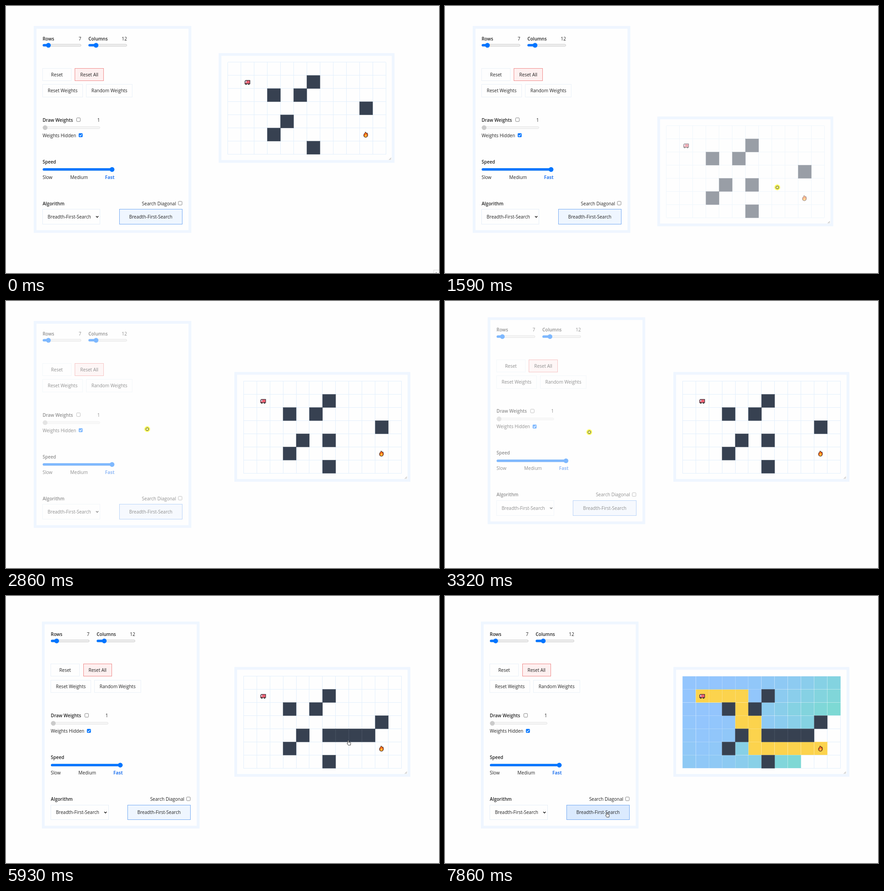
Recreate the animation shown at these times as an HTML page. Size 952 by 588 pixels, loop 7990 ms.

```html
<!DOCTYPE html>
<html lang="en">
<head>
<meta charset="utf-8">
<title>Pathfinding grid</title>
<style>
html, body { margin: 0; width: 100%; height: 100%; overflow: hidden; background: #fefefe; }
svg { display: block; width: 952px; height: 588px; font: 10px "Open Sans", "Noto Sans", sans-serif; fill: #222; }
.b { font-weight: 600; }
.crisp, #lines, #cells { shape-rendering: crispEdges; }
#cells rect { stroke: #fff; stroke-opacity: .25; }
#walls rect { stroke: #4b5563; stroke-width: .5; }
</style>
</head>
<body>
<svg id="stage" viewBox="0 0 952 588"></svg>
<script>
const LOOP = 7990, CELL = 28.96, GX = 487.8, GY = 124.2;
const MAZE = [
  '............',
  '......#.....',
  '...#.#......',
  '..........#.',
  '....#.......',
  '...#........',
  '......#.....'];
const ROWS = MAZE.length, COLS = MAZE[0].length;
const START = COLS + 1, GOAL = 5 * COLS + 10;
const SEARCH = 7050, VISIT = 10, FADE = 800;

// Walls in place, then four more added along one row
const walls = [];
MAZE.forEach((line, r) => [...line].forEach((ch, c) => { if (ch === '#') walls.push({ c, r, time: 0 }); }));
[790, 5070, 5405, 5740].forEach((time, i) => walls.push({ c: 6 + i, r: 4, time }));

const ramp = (t, a, b) => Math.min(1, Math.max(0, (t - a) / (b - a)));
const add = (a, b) => [a[0] + b[0], a[1] + b[1]];
const dim = (t, a, b) => 1 - (ramp(t, a, a + 100) - ramp(t, b, b + 125)) / 2;

// A dragged panel circles a centre while its radius changes
function swirl(u, center, radius, angle, sweep, power) {
  const a = angle + sweep * u ** power;
  return add(center, [radius * Math.sin(a), radius * Math.cos(a)]);
}
function gridAt(t) {
  const u = ramp(t, 860, 2290);
  return swirl(u, [34.4, 52.4], (63 + 198 * u) * (1 - u) ** .78, -2.56, 16, .95);
}
function menuAt(t) {
  const u = ramp(t, 2930, 3990);
  return swirl(u, [37, 34], 50.3 - 21.6 * u, -2.314, 12.46, .81);
}

const GRAB_GRID = [662, 262], GRAB_MENU = [312, 280.5], LEAD = 70;
const stops = [
  [70, 930, 560], [530, ...GRAB_GRID],
  [2430, ...add(GRAB_GRID, gridAt(LOOP))], [2690, ...GRAB_MENU],
  [4400, 332, 294], [4860, 764, 300], [5010, 736, 307],
  [5860, 792, 313], [5930, 755, 323], [6300, 295, 470], [6460, 357, 482]];
function cursorAt(t) {
  if (t >= 790 && t < 2400) return add(GRAB_GRID, gridAt(t + LEAD));
  if (t >= 2710 && t < 4300) return add(GRAB_MENU, menuAt(t + LEAD));
  const i = stops.findIndex(s => t < s[0]);
  if (i < 1) return stops.at(i).slice(1);
  const [a, x, y] = stops[i - 1], [b, x2, y2] = stops[i], k = ramp(t, a, b);
  return [x + (x2 - x) * k, y + (y2 - y) * k];
}
const presses = [[790, 2420], [2660, 4260], [6990, 7060], ...walls.slice(-3).map(w => [w.time, w.time + 70])];
const hovers = [[400, 2500], [4700, 6000], [6250, LOOP]];
const within = (spans, t) => spans.some(([a, b]) => t >= a && t < b);

// Breadth-first search: discovery order and shortest path
function search() {
  const blocked = new Set(walls.map(w => w.r * COLS + w.c));
  const from = new Map([[START, -1]]), queue = [START];
  while (queue.length && !from.has(GOAL)) {
    const n = queue.shift(), c = n % COLS, r = (n - c) / COLS;
    for (const [dx, dy] of [[0, -1], [1, 0], [0, 1], [-1, 0]]) {
      const x = c + dx, y = r + dy, m = y * COLS + x;
      if (x < 0 || y < 0 || x >= COLS || y >= ROWS || blocked.has(m) || from.has(m)) continue;
      from.set(m, n);
      queue.push(m);
      if (m === GOAL) break;
    }
  }
  const path = [];
  for (let n = GOAL; n >= 0; n = from.get(n)) path.unshift(n);
  return { order: [...from.keys()], path };
}
const { order, path } = search();
const PATH = SEARCH + order.length * VISIT + 20;

// SVG pieces; text y is the visual middle of the capitals
const text = (s, x, y, anchor = 'start', extra = '') =>
  `<text x="${x}" y="${y + 3.6}" text-anchor="${anchor}" ${extra}>${s}</text>`;
const label = (s, x, y) => text(s, x, y, 'start', 'class="b"');
const box = (x, y, w, h, fill, stroke, extra = '') =>
  `<rect x="${x}" y="${y}" width="${w}" height="${h}" fill="${fill}" stroke="${stroke}" ${extra}/>`;
const button = (s, x, y, w, h, fill = '#fefefe', stroke = '#eaf1f8', extra = '') =>
  box(x, y, w, h, fill, stroke, 'class="crisp" ' + extra) + text(s, x + w / 2, y + h / 2 + .3, 'middle');
const frame = (x, y, w, h) => box(x, y, w, h, '#fefefe', '#eff6ff', 'stroke-width="6"');
function slider(x, y, w, thumb, off) {
  const track = off ? ['#f6f6f6', '#dcdcdc'] : ['#efefef', '#b9b9b9'], tint = off ? '#cbcbcb' : '#0075ff';
  return box(x, y - 2.3, w, 4.6, ...track, 'rx="2.3" stroke-width=".7"') +
    (off ? '' : box(x - .3, y - 2.6, thumb - x, 5.2, tint, 'none', 'rx="2.6"')) +
    `<circle cx="${thumb}" cy="${y}" r="5.2" fill="${tint}"/>`;
}
const check = (x, y, on) => on
  ? box(x, y, 8, 8, '#0075ff', '#0075ff', 'rx="1.3" stroke-width=".6"') +
    `<path d="M${x + 1.6} ${y + 4.2}l1.7 1.8 3.2-4" fill="none" stroke="#fff" stroke-width="1.3"/>`
  : box(x, y, 8, 8, '#fff', '#767676', 'rx="1.3" stroke-width=".9"');

const menu = `
<g id="menu">${frame(64, 47, 340.4, 449.6)}<g id="menuBody">
${label('Rows', 80.5, 72)}${text('7', 165.5, 72, 'end')}${slider(81, 86.5, 84, 93.3)}
${label('Columns', 181.2, 72)}${text('12', 266, 72, 'end')}${slider(181.6, 86.5, 84, 198)}
${button('Reset', 80.5, 137.5, 63, 27)}
${button('Reset All', 152, 137.5, 62.5, 27, '#fef0f0', '#f08a8a')}
${button('Reset Weights', 80.5, 172.7, 88, 27.5)}
${button('Random Weights', 176.7, 172.7, 101.3, 27.5)}
${label('Draw Weights', 80.5, 251)}${check(155.3, 246.4)}${text('1', 206.5, 251, 'end')}
${slider(81, 267.9, 125.5, 86, true)}
${text('Weights Hidden', 80.5, 285)}${check(160.2, 280.6, true)}
${label('Speed', 80.5, 343)}${slider(81, 360, 157, 233.2)}
${text('Slow', 80.5, 377)}${text('Medium', 141.3, 377)}
${text('Fast', 238.7, 377, 'end', 'style="font-weight:700;fill:#2f7cf0"')}
${label('Algorithm', 80.5, 435)}${text('Search Diagonal', 374, 435, 'end')}${check(379, 430.3)}
${box(80.5, 447.8, 126.5, 32.4, '#fefefe', '#e6eff8', 'class="crisp"')}${text('Breadth-First-Search', 91.6, 464.3)}
<path d="M198 462.8l2.6 2.7 2.6-2.7" fill="none" stroke="#111" stroke-width="1.4"/>
${button('Breadth-First-Search', 249.2, 447.8, 138.3, 32.4, '#eff6ff', '#74aaf3', 'id="run"')}
</g></g>`;

const cellBox = (c, r, fill) => box(GX + c * CELL, GY + r * CELL, CELL, CELL, fill, 'none');
let lines = '';
for (let c = 0; c <= COLS; c++) lines += `M${GX + c * CELL} ${GY}v${ROWS * CELL}`;
for (let r = 0; r <= ROWS; r++) lines += `M${GX} ${GY + r * CELL}h${COLS * CELL}`;

const truck = `<g transform="translate(531 168.6)">
<path d="M-5.5 3V-2.5L-4-4.5H5.5V3z" fill="#e63950" stroke="#23202a" stroke-width="1.1"/>
<path d="M-4.6-.2v-2.2l1-1.2h1.8v3.4z" fill="#bfe3f2"/>
<path d="M-.5-2.6H4.8M-5 1H5" stroke="#ffd0d4" stroke-width=".9"/>
<circle cx="-3" cy="3.6" r="1.5"/><circle cx="3" cy="3.6" r="1.5"/></g>`;
const fire = `<g transform="translate(791 283.8)">
<path d="M-1-6C1.5-5 2-3 2.6-2.6L3.2-4C5.5-.5 5 5.6 0 5.6S-5.2 0-2.8-2.6C-1.8-3.6-.8-4.5-1-6z" fill="#f4661b" stroke="#241c1a"/>
<path d="M.3-1.4C2.6 1 2.8 4.8 0 4.8S-2.6 1.6.3-1.4z" fill="#ffc83d"/></g>`;

const grid = `
<g id="grid">${frame(470.7, 107, 380.8, 235.6)}<g id="gridBody">
<path id="lines" d="${lines}" fill="none" stroke="#e2effc"/>
<g id="cells">${order.map(n => cellBox(n % COLS, Math.floor(n / COLS), 'none')).join('')}</g>
<g id="walls">${walls.map(w => cellBox(w.c, w.r, '#374151')).join('')}</g>
${truck}${fire}</g>
<path d="M842.5 339l4.5-4.5M845 339l2-2" stroke="#888" stroke-width=".8"/></g>`;

const cursor = `
<g id="cursor" stroke="#222" stroke-width=".9" fill="#fff" stroke-linejoin="round">
<path id="arrow" d="M-2-4.8v8.6L.1 2 1.5 5l1.4-.6L1.6 1.6H4z"/>
<path id="hand" d="M-2.2 .8V-4.6q1-1.4 2 0v3l3.2.7q1.4.4 1.2 2L3.6 5H-1.4L-4 1.4q.3-1.6 1.8-.6z"/>
<g id="grip"><circle r="6.3" fill="#ffff4a" fill-opacity=".9" stroke="none"/>
<path d="M-3-.4Q-2.6-2.8-.4-2.9 2.8-3.4 3.2-1 3.4 2 1.8 3H-1.6Q-3.4 1.4-3-.4z" fill="#fbfb9a"/></g></g>`;
const corner = `<g id="corner">${box(940.5, 581.5, 14, 9, '#fefefe', '#dcdcdc')}
<path d="M945 585.5v2.5l2.4-.4z" fill="#888"/></g>`;

document.getElementById('stage').innerHTML = menu + grid + corner + cursor;
const $ = id => document.getElementById(id);
const cellEls = [...$('cells').children], wallEls = [...$('walls').children];
const show = (el, on) => el.setAttribute('visibility', on ? 'visible' : 'hidden');
const move = (el, [x, y]) => el.setAttribute('transform', `translate(${x} ${y})`);

function visitColor(age) {
  const k = 1 - (1 - Math.min(1, age / FADE)) ** 2.2;
  const from = [110, 231, 183], to = [147, 197, 253];
  return `rgb(${from.map((v, i) => Math.round(v + (to[i] - v) * k))})`;
}
function cellColor(n, i, t) {
  const step = path.indexOf(n);
  if (step >= 0 && t >= PATH + step * 10) return '#fcd34d';
  return visitColor(t - SEARCH - i * VISIT);
}

function draw(t) {
  move($('grid'), gridAt(t));
  move($('menu'), menuAt(t));
  $('gridBody').setAttribute('opacity', dim(t, 790, 2420));
  $('menuBody').setAttribute('opacity', dim(t, 2610, 4255));
  cellEls.forEach((el, i) => {
    show(el, t >= SEARCH + i * VISIT);
    el.setAttribute('fill', cellColor(order[i], i, t));
  });
  wallEls.forEach((el, i) => show(el, t >= walls[i].time));
  $('run').setAttribute('fill', t >= 6270 ? '#dbeafe' : '#eff6ff');

  const pressed = within(presses, t), over = within(hovers, t);
  show($('corner'), t < 70);
  show($('grip'), pressed);
  show($('hand'), !pressed && over);
  show($('arrow'), !pressed && !over && t >= 70);
  move($('cursor'), cursorAt(t));
}

const begin = performance.now();
function tick() {
  draw((performance.now() - begin) % LOOP);
  requestAnimationFrame(tick);
}
tick();
</script>
</body>
</html>
```
